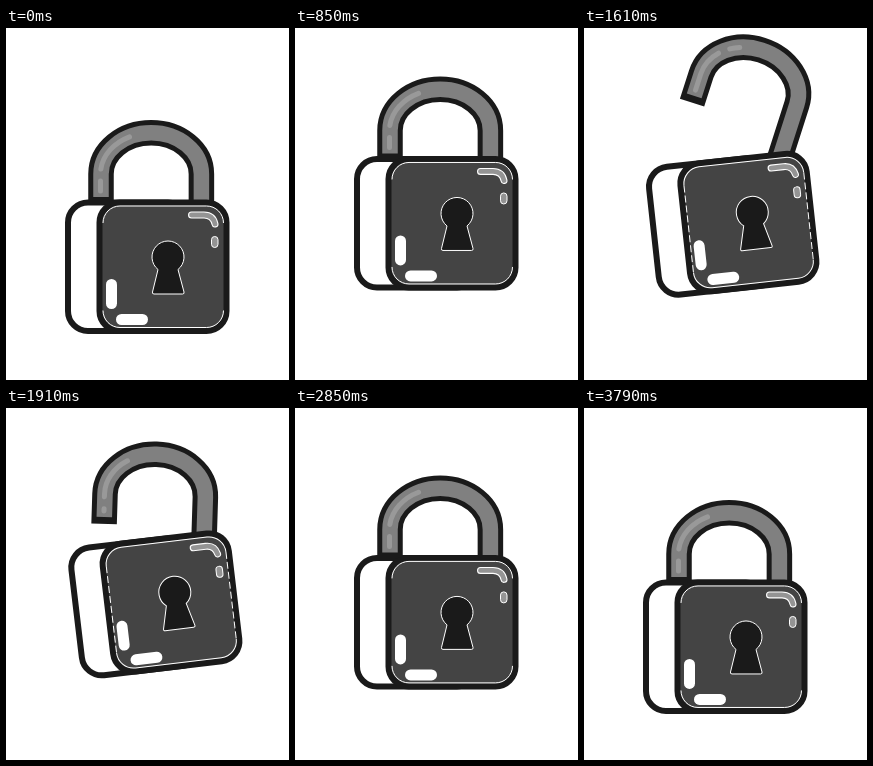
These frames come from a looping animation (283 by 352 pixels, 3850 ms). An HTML page:

```html
<!DOCTYPE html>
<html lang="en">
<head>
<meta charset="utf-8">
<title>Padlock</title>
<style>
  html, body { margin: 0; width: 100%; height: 100%; overflow: hidden; background: #fff; }
  svg { display: block; width: 283px; height: 352px; }
  .outline { stroke: #1a1a1a; stroke-width: 6; }
  .rim { stroke: #fff; stroke-width: 1; }
</style>
</head>
<body>
<svg viewBox="0 0 283 352" fill="none">
  <g id="lock">
    <g id="shackle">
      <path d="M95 176V146a50.2 41.2 0 0 1 100.4 0V215" stroke="#1a1a1a" stroke-width="25.5"/>
      <path d="M95 169V146a50.2 41.2 0 0 1 100.4 0V215" stroke="#808080" stroke-width="15.5"/>
      <path id="shine" d="M94.5 163V146A50.5 41 0 0 1 126 108" stroke="#999" stroke-width="5"
        stroke-linecap="round" stroke-dasharray="10 12 45 12"/>
    </g>
    <rect class="outline" x="62" y="174.5" width="120" height="128.5" rx="20" fill="#fff"/>
    <rect class="outline" x="93.5" y="174.5" width="127" height="128.5" rx="20" fill="#444"/>
    <path class="rim" d="M97 195A17 17 0 0 1 114 178H200.5A17 17 0 0 1 217.5 195M217.5 282.5A17 17 0 0 1 200.5 299.5H114A17 17 0 0 1 97 282.5"/>
    <path id="sides" class="rim" d="M97 195V282.5M217.5 195V282.5" stroke-dasharray="7 3"/>
    <path class="rim" fill="#1a1a1a" d="M152 241.5A16 16 0 1 1 172 241.5L178 264Q178.500 266 176.500 266H148Q146 266 146.500 264Z"/>
    <g fill="#fff">
      <rect x="100" y="251" width="11" height="30" rx="5.5"/>
      <rect x="110" y="286" width="32" height="11" rx="5.5"/>
    </g>
    <g stroke-linecap="round">
      <path d="M185.5 187H198Q207 187 209 196" stroke="#fff" stroke-width="7"/>
      <path d="M185.5 187H198Q207 187 209 196" stroke="#949494" stroke-width="4.8"/>
    </g>
    <rect class="rim" x="205.5" y="208.5" width="6.5" height="11" rx="3.2" fill="#949494"/>
  </g>
</svg>
<script>
  const LOOP = 3850;
  const [lock, shackle, shine, sides] =
    ['lock', 'shackle', 'shine', 'sides'].map(id => document.getElementById(id));
  const clamp = u => Math.min(1, Math.max(0, u));
  const smooth = u => u * u * (3 - 2 * u);

  // Eased value at time t through [time, value] keys.
  function track(t, keys) {
    let value = keys[0][1];
    for (let i = 1; i < keys.length; i++) {
      const [t0, v0] = keys[i - 1], [t1, v1] = keys[i];
      if (t >= t0) value = v0 + (v1 - v0) * smooth(clamp((t - t0) / (t1 - t0)));
    }
    return value;
  }

  function lift(t) {
    if (t < 2200) return 44 * smooth(clamp((t - 90) / 810));
    const u = clamp((t - 2200) / 1620);
    return 44 * (1 - u - u ** 3 * (1 - u));
  }

  function draw(t) {
    const open = track(t, [[1040, 0], [1380, 1.05], [1600, 1], [1720, 1], [2040, 0]]);
    const tilt = track(t, [[1200, 0], [1790, -8], [2280, 0]]);
    lock.setAttribute('transform', `translate(0 ${-lift(t)}) rotate(${tilt} 159 171)`);
    shackle.setAttribute('transform', `translate(0 ${-22 * open}) rotate(${24 * open} 200 200.5)`);
    shine.setAttribute('stroke-dashoffset', 22 * open);
    sides.setAttribute('opacity', clamp(-tilt / 3));
  }

  const start = performance.now();
  function frame() {
    draw((performance.now() - start) % LOOP);
    requestAnimationFrame(frame);
  }
  frame();
</script>
</body>
</html>
```
